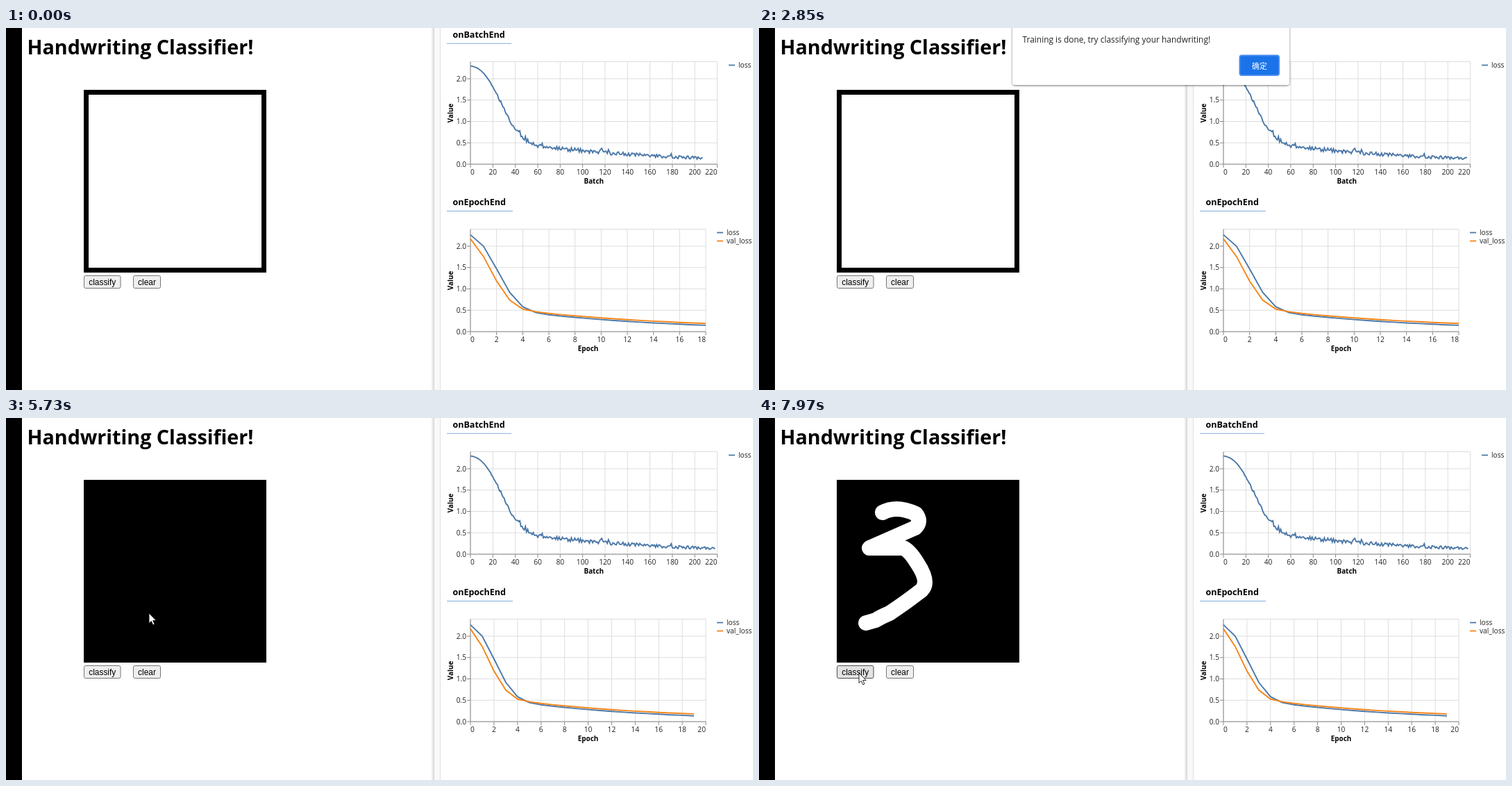
An HTML page for the animation above (8000 ms loop, 1076 by 521 pixels).

```html
<!DOCTYPE html>
<html lang="en">
<head>
<meta charset="utf-8">
<title>Handwriting Classifier</title>
<style>
html, body { margin: 0; width: 100%; height: 100%; overflow: hidden; background: #fff; }
svg { display: block; width: 1076px; height: 521px; font-family: "Open Sans", "Noto Sans", sans-serif; }
.ui { font: 11.9px "Liberation Sans", Arial, sans-serif; }
.label { font-size: 10.2px; fill: #222; }
.title { font-size: 9.9px; font-weight: 700; }
.head { font-size: 12.5px; font-weight: 700; }
</style>
</head>
<body>
<svg id="stage" viewBox="0 0 1076 521">
  <defs>
    <linearGradient id="edge">
      <stop offset="0" stop-color="#fff"/>
      <stop offset="1" stop-color="#d4d4d4"/>
    </linearGradient>
    <filter id="shadow" x="-5%" y="-20%" width="110%" height="150%">
      <feDropShadow dx="0" dy="1" stdDeviation="1.8" flood-color="#000" flood-opacity=".55"/>
    </filter>
  </defs>
</svg>
<script>
const LOOP = 8000;
const BLUE = '#4c78a8', ORANGE = '#f58518';
const stage = document.getElementById('stage');

function el(tag, attrs, parent = stage, text) {
  const node = document.createElementNS('http://www.w3.org/2000/svg', tag);
  for (const key in attrs) node.setAttribute(key, attrs[key]);
  if (text) node.textContent = text;
  parent.appendChild(node);
  return node;
}
const rect = (x, y, width, height, fill, parent, more) =>
  el('rect', { x, y, width, height, fill, ...more }, parent);
const line = (x1, y1, x2, y2, stroke, parent, width = 1) =>
  el('line', { x1, y1, x2, y2, stroke, 'stroke-width': width }, parent);
const label = (x, y, text, cls, parent, more) =>
  el('text', { x, y, class: cls, ...more }, parent, text);
const curve = stroke => el('polyline', { fill: 'none', stroke, 'stroke-width': 1.9 });
const show = (node, on) => node.setAttribute('visibility', on ? 'visible' : 'hidden');

// share of the time span a..b that has passed, from 0 to 1
const span = (t, a, b) => Math.min(1, Math.max(0, (t - a) / (b - a)));

// ---- page ----
rect(0, 0, 23, 521, '#000');
rect(612, 0, 5, 521, 'url(#edge)');
rect(617, 0, 8, 521, '#f9f9f9');
rect(625, 0, 1, 521, '#e0e0e0');
label(30.5, 37.5, 'Handwriting Classifier!', '', stage, { 'font-size': 28.7, 'font-weight': 700 });
rect(112, 89, 263, 263, '#000');
const paper = rect(119, 96, 249, 249, '#fff');

function button(x, width, text) {
  const box = rect(x + .5, 356.5, width - 1, 18, '#efefef', stage, { stroke: '#767676', rx: 2.2 });
  label(x + width / 2, 369.5, text, 'ui', stage, { 'text-anchor': 'middle' });
  return box;
}
const classify = button(112, 53.5, 'classify');
button(183, 40, 'clear');

// ---- charts ----
const UNIT = 61.5, LEFT = 669, BATCH_Y = 196, EPOCH_Y = 437;

function axes(bottom, right, max, step, name) {
  const g = el('g', {}), top = bottom - 147.5;
  for (let v = 0; v <= max; v += step) {
    const x = LEFT + (right - LEFT) * v / max;
    line(x, top, x, bottom, '#ddd', g);
    line(x, bottom, x, bottom + 5, '#888', g);
    const anchor = v === 0 ? 'start' : v === max ? 'end' : 'middle';
    label(x, bottom + 15, String(v), 'label', g, { 'text-anchor': anchor });
  }
  for (let v = 0; v <= 2; v += .5) {
    const y = bottom - v * UNIT;
    line(LEFT, y, right, y, '#ddd', g);
    line(LEFT - 5, y, LEFT, y, '#888', g);
    label(663, y + 3.7, v.toFixed(1), 'label', g, { 'text-anchor': 'end' });
  }
  line(LEFT, top, right, top, '#ddd', g);
  line(LEFT, top, LEFT, bottom, '#888', g);
  line(LEFT, bottom, right, bottom, '#888', g);
  label((LEFT + right) / 2, bottom + 28.3, name, 'title', g, { 'text-anchor': 'middle' });
  label(0, 0, 'Value', 'title', g,
    { 'text-anchor': 'middle', transform: `translate(643.5 ${bottom - 73.5}) rotate(-90)` });
  return g;
}
function heading(y, text, width) {
  label(643.5, y, text, 'head');
  line(635, y + 8.5, 635 + width, y + 8.5, '#83aee0');
}
function legend(x, y, text, color) {
  line(x, y, x + 9, y, color, stage, 1.8);
  label(x + 14, y + 3, text, 'label');
}
const plot = (values, bottom, right, max) => values.map((v, i) =>
  `${(LEFT + (right - LEFT) * i / max).toFixed(1)},${(bottom - v * UNIT).toFixed(1)}`).join(' ');

heading(13.8, 'onBatchEnd', 93);
axes(BATCH_Y, 1024.5, 220, 20, 'Batch');
legend(1041, 53.5, 'loss', BLUE);
const batchLine = curve(BLUE);

heading(255, 'onEpochEnd', 95);
const epochAxes = [18, 20].map(max => axes(EPOCH_Y, 1008, max, 2, 'Epoch'));
legend(1024, 294.5, 'loss', BLUE);
legend(1024, 306.5, 'val_loss', ORANGE);
const lossLine = curve(BLUE), valLine = curve(ORANGE);

// a steep early drop on top of a slow decay
const lossAt = batch => 1.64 * Math.exp(-((batch / 33.1) ** 2.5)) + .66 * Math.exp(-batch / 135);

let seed = 11;
const random = () => (seed = seed * 16807 % 2147483647) / 2147483647;
const batchLoss = Array.from({ length: 219 }, (_, i) => {
  const size = Math.min(1, (i / 45) ** 2) * (.11 - i * .0002);
  const spike = random() > .95 ? .7 : 0;
  return lossAt(i) + size * (random() - .5 + spike);
});
const epochs = Array.from({ length: 20 }, (_, i) => i);
const loss = epochs.map(e => lossAt(11 * e + 4.5));
const valLoss = epochs.map(e => lossAt(11 * e + 10) + .05 * Math.min(1, e / 5) ** 2);

// ---- pen, dialog, cursor ----
const route = (d, more) => el('path', { d, fill: 'none', ...more });
const ink = route('M178 136Q198 125 226 138Q234.5 149 225 158L159 187H208' +
  'Q217 191 228 209Q246 236 234 248Q212 265 188 281Q176 286 168 291L154 295',
  { stroke: '#fff', 'stroke-width': 22, 'stroke-linecap': 'round', 'stroke-linejoin': 'round' });
const inkLength = ink.getTotalLength();
const penShare = t => .16 * span(t, 6370, 6720) + .84 * span(t, 6720, 7510);

const dialog = el('g', {});
rect(365, -12, 399, 94, '#fff', dialog, { rx: 4, filter: 'url(#shadow)' });
label(379.5, 21, 'Training is done, try classifying your handwriting!', '', dialog,
  { 'font-size': 11.95, fill: '#222' });
const ok = rect(692.5, 39.5, 56.5, 28.5, '#1a73e8', dialog, { rx: 3, stroke: '#4a8cf0', 'stroke-width': 2 });
const ripple = rect(708, 40.5, 40, 26.5, '#4585dd', dialog, { rx: 2 });
label(721, 59, '确定', '', dialog, { 'font-size': 11, fill: '#fff', 'text-anchor': 'middle',
  'font-family': '"Noto Sans CJK SC", "Noto Sans CJK", sans-serif' });

const cursor = el('path', { d: 'M0 0V14.4L3.3 11.4 5.7 16.8 8 15.8 5.7 10.5H10.2Z',
  fill: '#fff', stroke: '#111', 'stroke-width': .9 });

const moves = [
  [3480, 3870, 'M1007 510Q740 54 671 54'],
  [3870, 4240, 'M671 54L732 51'],
  [5160, 5730, 'M732 51Q420 160 206 281'],
  [5810, 6370, 'M206 281Q200 380 175 135'],
  [7660, 7970, 'M151 294L144 367']
].map(([from, to, d]) => ({ from, to, path: route(d) }));

function along(path, share) {
  const p = path.getPointAtLength(path.getTotalLength() * share);
  return [p.x, p.y];
}
function cursorAt(t) {
  if (t >= 6370 && t < 7660) {
    const [x, y] = along(ink, penShare(t));
    return [x - 3, y - 1];
  }
  const move = moves.filter(m => t >= m.from).pop() || moves[0];
  return along(move.path, span(t, move.from, move.to));
}

function draw(t) {
  // one more batch about every 283 ms until training ends
  const batches = Math.min(219, 208 + Math.floor((t + 215) / 283));
  batchLine.setAttribute('points', plot(batchLoss.slice(0, batches), BATCH_Y, 1024.5, 220));

  const done = t >= 4940, max = done ? 20 : 18, count = done ? 20 : 19;
  epochAxes.forEach((g, i) => show(g, done === (i === 1)));
  lossLine.setAttribute('points', plot(loss.slice(0, count), EPOCH_Y, 1008, max));
  valLine.setAttribute('points', plot(valLoss.slice(0, count), EPOCH_Y, 1008, max));
  paper.setAttribute('fill', done ? '#000' : '#fff');

  const fade = span(t, 2640, 2850) - span(t, 5110, 5250);
  dialog.setAttribute('opacity', fade);
  show(dialog, fade > 0);
  const hover = t >= 4180;
  ok.setAttribute('fill', hover ? '#2f7be0' : '#1a73e8');
  ok.setAttribute('stroke', hover ? '#3580e3' : '#4a8cf0');
  show(ripple, hover && fade > 0);

  show(cursor, t >= 3480);
  cursor.setAttribute('transform', `translate(${cursorAt(t)})`);
  show(ink, t >= 6370);
  ink.setAttribute('stroke-dasharray', `${inkLength * penShare(t)} ${inkLength * 2}`);

  const over = t >= 7890;
  classify.setAttribute('fill', over ? '#e3e3e3' : '#efefef');
  classify.setAttribute('stroke', over ? '#4f4f4f' : '#767676');
}

const start = performance.now();
function frame() {
  draw((performance.now() - start) % LOOP);
  requestAnimationFrame(frame);
}
frame();
</script>
</body>
</html>
```
